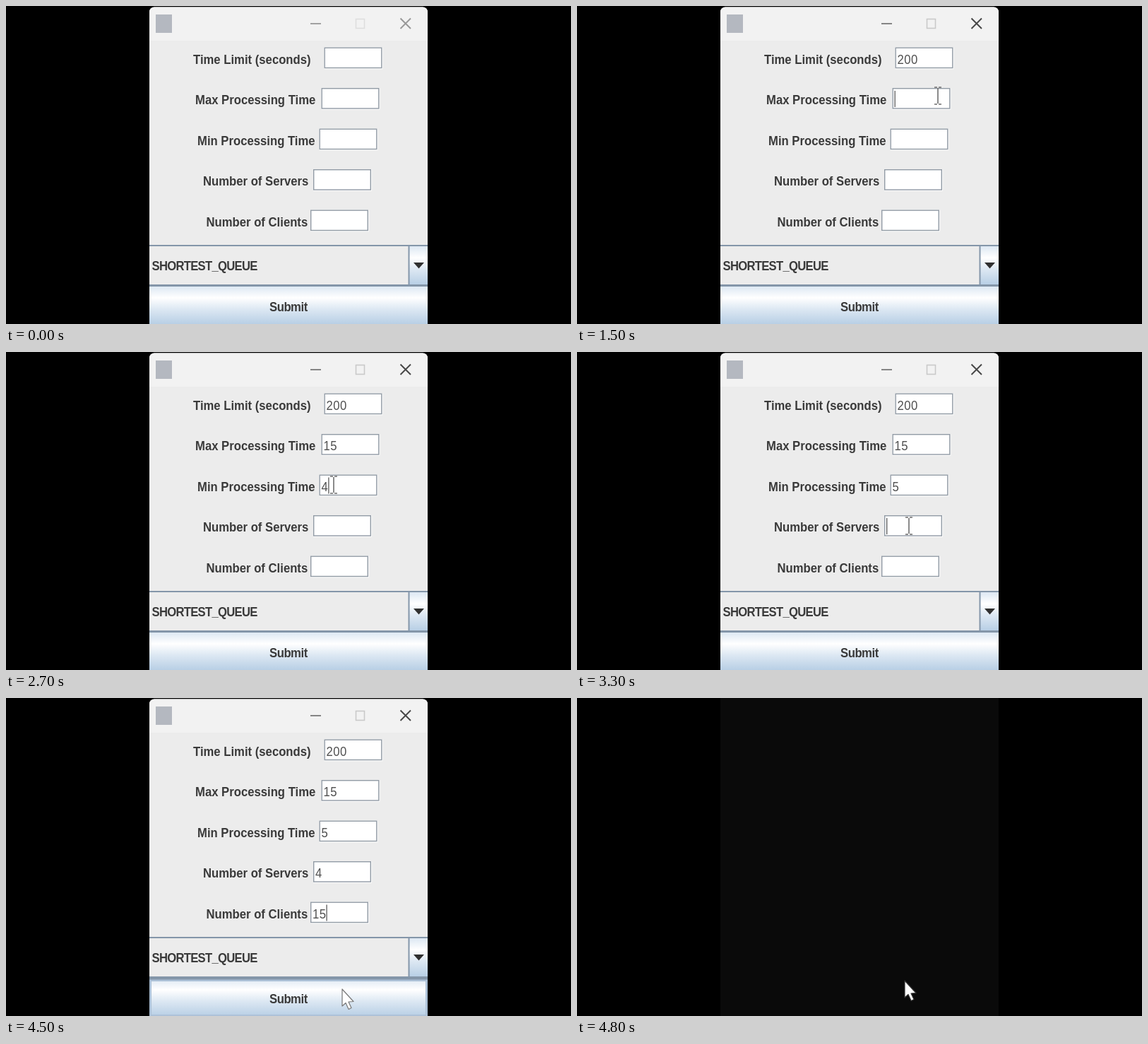
These frames come from a looping animation (800 px wide and 450 px high, 4900 ms). An HTML page with a canvas:

```html
<!DOCTYPE html>
<html lang="en">
<head>
<meta charset="utf-8">
<title>Queue settings form</title>
<style>
  html, body { margin: 0; width: 100%; height: 100%; overflow: hidden; background: #000; }
  canvas { display: block; width: 800px; height: 450px; filter: blur(0.55px); }
</style>
</head>
<body>
<canvas id="stage" width="800" height="450"></canvas>
<script>
const ctx = document.getElementById('stage').getContext('2d');
const LOOP = 4900, STEP = 100, PITCH = 57.5;
const LINE = '#8496a9', FACE = '#ececec', INK = '#3a3a3a';
const SQUEEZE = 0.927; // the window is slightly narrower than its natural shape

// label, label x, field x, typed text as [ms, value], focus time
const rows = [
  { label: 'Time Limit (seconds)', lx: 265, fx: 450.5, focus: 700, typed: [[900, '2'], [1000, '20'], [1100, '200']] },
  { label: 'Max Processing Time', lx: 268, fx: 446.5, focus: 1500, typed: [[1700, '1'], [1800, '15']] },
  { label: 'Min Processing Time', lx: 271, fx: 443.5, focus: 2300, typed: [[2600, '4'], [2800, ''], [2900, '5']] },
  { label: 'Number of Servers', lx: 279, fx: 435, focus: 3300, typed: [[3500, '4']] },
  { label: 'Number of Clients', lx: 283.5, fx: 431, focus: 3800, typed: [[4100, '1'], [4200, '15']] }
];

// ms, x, y of the pointer's hot spot
const path = [
  [400, 592, 150], [700, 512, 80], [1100, 511, 80], [1400, 511, 127],
  [1800, 511, 127], [2200, 464, 188], [2900, 464, 188], [3200, 470, 246],
  [3500, 470, 246], [3700, 462, 305], [4200, 462, 305], [4500, 476, 412],
  [4600, 473, 412], [4700, 469, 407], [4800, 464, 400]
];

function pointerAt(t) {
  if (t < path[0][0]) return null;
  for (let i = 1; i < path.length; i++) {
    const [t0, x0, y0] = path[i - 1], [t1, x1, y1] = path[i];
    if (t <= t1) {
      const k = (t - t0) / (t1 - t0), e = k * k * (3 - 2 * k);
      return { x: x0 + (x1 - x0) * e, y: y0 + (y1 - y0) * e };
    }
  }
}

function box(x, y, w, h, color) {
  ctx.fillStyle = color;
  ctx.fillRect(x, y, w, h);
}

function frame(x, y, w, h, color, width) {
  ctx.strokeStyle = color;
  ctx.lineWidth = width;
  ctx.strokeRect(x, y, w, h);
}

function shape(points, fill) {
  ctx.beginPath();
  points.forEach(([x, y]) => ctx.lineTo(x, y));
  ctx.closePath();
  ctx.fillStyle = fill;
  ctx.fill();
}

function strokes(lines, color, width) {
  ctx.strokeStyle = color;
  ctx.lineWidth = width;
  ctx.beginPath();
  for (const [x0, y0, x1, y1] of lines) {
    ctx.moveTo(x0, y0);
    ctx.lineTo(x1, y1);
  }
  ctx.stroke();
}

// Draws text and returns its width on the stage.
function text(str, x, y, weight, color, spacing = 0) {
  ctx.save();
  ctx.translate(x, y);
  ctx.scale(SQUEEZE, 1);
  ctx.font = weight + ' 18px "Liberation Sans", Arial, sans-serif';
  ctx.letterSpacing = spacing + 'px';
  ctx.fillStyle = color;
  ctx.fillText(str, 0, 0);
  const w = ctx.measureText(str).width * SQUEEZE;
  ctx.restore();
  return w;
}

function glossy(x, y, w, h) {
  const g = ctx.createLinearGradient(0, y, 0, y + h);
  g.addColorStop(0, '#dde8f3');
  g.addColorStop(0.3, '#fff');
  g.addColorStop(0.6, '#dde8f3');
  g.addColorStop(1, '#b8cfe5');
  box(x, y, w, h, g);
}

function titleBar(t) {
  box(203, 1, 394, 48, '#f2f2f2');
  box(212, 12, 23, 26, '#b4b8c0');
  const [min, max, close] = t < 700 ? ['#a2a2a2', '#dedede', '#999']
    : t < 4600 ? ['#858585', '#c9c9c9', '#484848'] : ['#333', '#333', '#333'];
  strokes([[431, 25, 446, 25]], min, 2);
  frame(495.5, 18.5, 12, 13, max, t < 4600 ? 1.6 : 2);
  strokes([[558.5, 17.5, 573, 32], [573, 17.5, 558.5, 32]], close, 2);
}

function formRow(row, i, t) {
  const y = 58.5 + i * PITCH, base = 81.5 + i * PITCH;
  text(row.label, row.lx, base, 'bold', INK);
  box(row.fx, y, 83, 31, '#fafafa');
  box(row.fx, y, 81.5, 29.5, '#fff');
  frame(row.fx + 0.7, y + 0.7, 80.6, 28.3, '#929ba5', 1.4);
  const last = row.typed.filter(k => k[0] <= t).pop();
  const value = last ? last[1] : '';
  const w = value ? text(value, row.fx + 3, base, 'normal', '#505050', 0.45) : 0;
  const next = rows[i + 1] ? rows[i + 1].focus : 4600;
  if (t >= row.focus && t < next) box(row.fx + 3 + w, y + 4, 1.4, 23, '#666');
}

function combo() {
  box(203, 338, 394, 2, LINE);
  glossy(571, 340, 26, 54);
  box(569.5, 339, 2, 56, LINE);
  box(203, 394, 394, 3, LINE);
  text('SHORTEST_QUEUE', 206.5, 374, 'bold', INK, -0.8);
  shape([[577, 363], [592, 363], [584.5, 371.5]], '#303030');
}

function submit(t) {
  if (t >= 4600) {
    box(203, 398, 394, 52, '#b8c9d8');
    frame(371, 411.5, 58, 25, '#9fb1c3', 1.5);
  } else {
    glossy(203, 397, 394, 53);
    if (t >= 4400) {
      frame(204.5, 399.5, 391, 50, '#adc2d8', 3);
      box(203, 397, 394, 1.5, LINE);
    }
  }
  text('Submit', 373, 431.5, 'bold', INK, -0.5);
}

function appWindow(t) {
  const [shade, scale] = t < 4600 ? [0, 1] : t < 4700 ? [0.06, 1] : [0.6, 0.96];
  ctx.save();
  ctx.beginPath();
  ctx.rect(203, 0, 394, 450);
  ctx.clip();
  ctx.translate(400, 225);
  ctx.scale(scale, scale);
  ctx.translate(-400, -225);
  ctx.beginPath();
  ctx.roundRect(203, 1.5, 394, 456, 7);
  ctx.clip();
  box(203, 1, 394, 457, FACE);
  titleBar(t);
  rows.forEach((row, i) => formRow(row, i, t));
  combo();
  submit(t);
  box(203, 1, 394, 457, `rgba(10, 10, 10, ${shade})`);
  ctx.restore();
}

function pointer(t) {
  const p = pointerAt(t);
  if (!p) return;
  const overField = t < 4700 && rows.some((r, i) => {
    const dx = p.x - r.fx, dy = p.y - 59 - i * PITCH;
    return dx >= 0 && dx <= 82 && dy >= 0 && dy <= 30;
  });
  ctx.save();
  ctx.translate(p.x, p.y);
  if (overField) {
    strokes([[0, -11, 0, 11], [-5, -12, -1, -12], [1, -12, 5, -12],
      [-5, 12, -1, 12], [1, 12, 5, 12]], '#6e6e6e', 1.6);
  } else {
    shape([[0, 0], [0, 24], [5, 19.5], [9.2, 28.5], [13, 26.5], [9, 18], [16, 17.5]], '#fff');
    ctx.strokeStyle = t < 4700 ? '#777' : '#333';
    ctx.lineWidth = 1.2;
    ctx.lineJoin = 'round';
    ctx.stroke();
  }
  ctx.restore();
}

function draw(now) {
  const t = Math.floor((now % LOOP) / STEP) * STEP;
  box(0, 0, 800, 450, '#000');
  box(203, 0, 394, 450, t < 4600 ? '#000' : '#0a0a0a');
  if (t < 4800) appWindow(t);
  pointer(t);
}

const start = performance.now();
function tick() {
  draw(performance.now() - start);
  requestAnimationFrame(tick);
}
tick();
</script>
</body>
</html>
```
